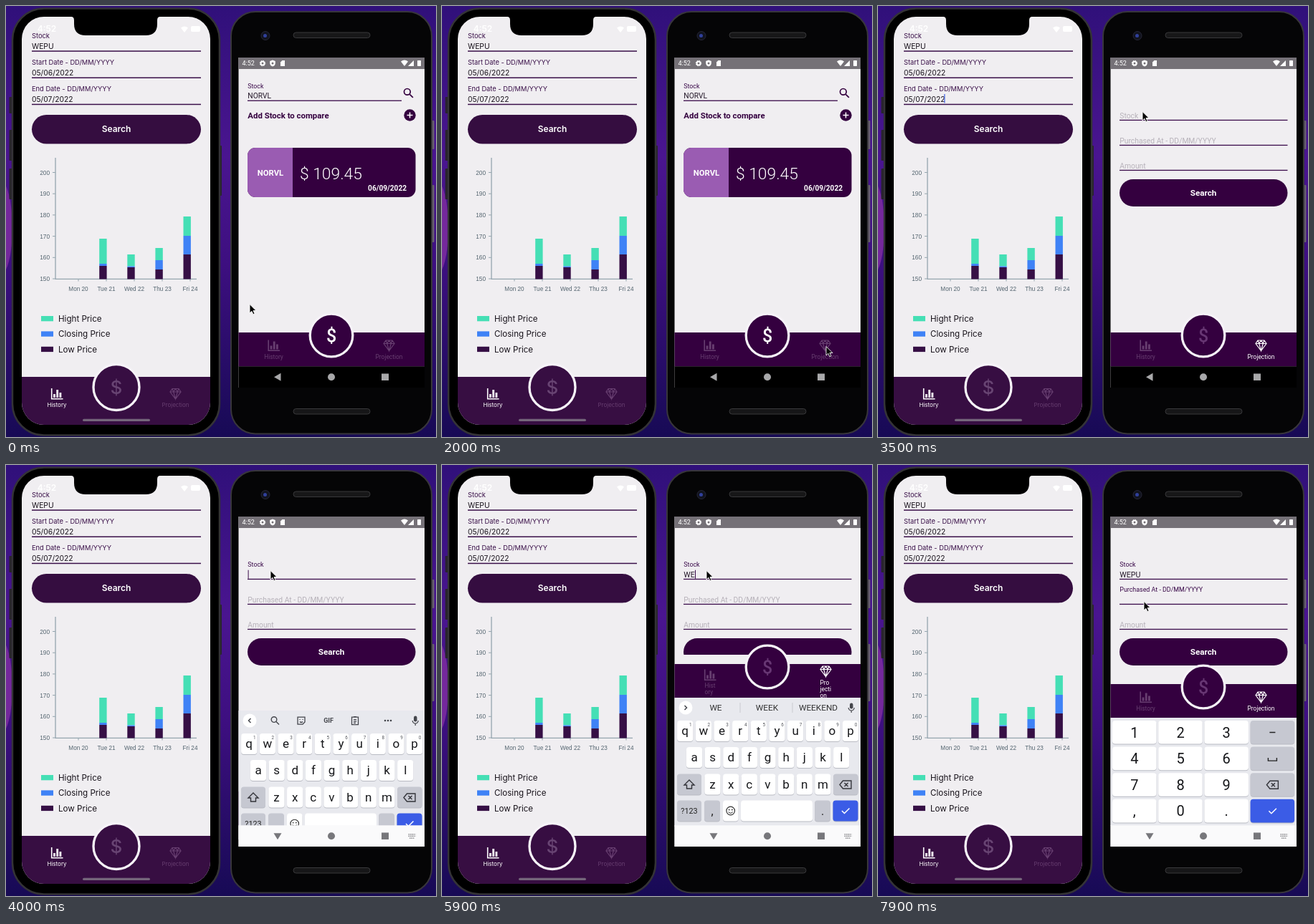
An HTML page that plays this animation: 600 px wide and 602 px high, repeating every 8000 ms.

```html
<!DOCTYPE html>
<html lang="en">
<head>
<title>Stock app on two phones</title>
<style>
html, body { margin: 0; width: 100%; height: 100%; overflow: hidden; background: #1d0a5c; }
svg { display: block; width: 600px; height: 602px; }
text { font-family: Roboto, "Open Sans", sans-serif; white-space: pre; }
.ios text { font-family: Inter, Roboto, sans-serif; }
.ios .axis text { font-family: "Liberation Sans", Arial, sans-serif; }
</style>
</head>
<body>
<svg viewBox="0 0 600 602">
  <defs>
    <linearGradient id="bg" x2="0" y2="1">
      <stop offset="0" stop-color="#30107a"/><stop offset=".35" stop-color="#4a1590"/>
      <stop offset=".6" stop-color="#3d0f80"/><stop offset="1" stop-color="#170a55"/>
    </linearGradient>
    <clipPath id="screen"><rect x="324.5" y="72" width="259.5" height="461"/></clipPath>
    <clipPath id="scroll"><rect x="324" y="88" width="260" height="177"/></clipPath>
    <clipPath id="card"><rect x="337" y="198" width="234.5" height="69" rx="11"/></clipPath>
  </defs>
  <rect width="600" height="602" fill="url(#bg)"/>
  <ellipse cx="-8" cy="310" rx="17" ry="66" fill="#74289c"/>
  <g id="ios" class="ios"></g>
  <g id="body"></g>
  <g clip-path="url(#screen)"><g id="app"></g><g id="keys"></g><g id="nav"></g></g>
  <path id="mouse" d="M0 0v12.5l2.9-2.7 2 4.4 2.1-.9-2-4.3h4z" stroke="#fff" stroke-width=".9"/>
</svg>
<script>
const $ = id => document.getElementById(id);
const LIGHT = '#f0eef1', PLUM = '#34003f', GRAPE = '#370e42', KEY = '#c6c8d1', DIM = '#673e70';
const TICKER = 'WEPU', OTHER = 'NORVL';

const rect = (x, y, w, h, fill, rx = 0, more = '') =>
  `<rect x="${x}" y="${y}" width="${w}" height="${h}" fill="${fill}" rx="${rx}" ${more}/>`;
const circle = (x, y, r, fill, more = '') => `<circle cx="${x}" cy="${y}" r="${r}" fill="${fill}" ${more}/>`;
const text = (x, y, s, size, fill, anchor = 'start', weight = 400, more = '') =>
  `<text x="${x}" y="${y}" font-size="${size}" fill="${fill}" text-anchor="${anchor}" font-weight="${weight}" ${more}>${s}</text>`;
const mid = (x, y, s, size, fill, weight) => text(x, y, s, size, fill, 'middle', weight);
const line = (d, color, w = 1.5, x = 0, y = 0) =>
  `<path d="${d}" transform="translate(${x} ${y})" fill="none" stroke="${color}" stroke-width="${w}"/>`;
const shape = (d, fill, x = 0, y = 0) => `<path d="${d}" transform="translate(${x} ${y})" fill="${fill}"/>`;

// Icons, placed by their centre
const bars = (x, y, c) => line('M-7.3-8V6.7H8.5', c, 1.6, x, y) + line('M-3.5 5V0M.7 5V-6M4.9 5V-2', c, 2.8, x, y);
const gem = (x, y, c) => line('M-4.5-7h9L7.5-2.5 0 7.5-7.5-2.5zM-7.5-2.5h15M-4.5-7l1.7 4.5L0 7.5l2.8-10L4.5-7M0-7l-2.8 4.5M0-7l2.8 4.5', c, 1.2, x, y);
const lens = (x, y, c, k, w) => line(`M${k} ${k}L${3 * k} ${3 * k}`, c, w, x, y) + circle(x - k * .5, y - k * .5, k * 1.9, 'none', `stroke="${c}" stroke-width="${w}"`);
const wifi = (x, y) => shape('M-5-2.5Q0-6.5 5-2.5L0 4z', '#fff', x, y);
const tick = (x, y) => line('M-5 0l3.5 3.5 7-7', '#fff', 1.5, x, y);
const erase = (x, y) => line('M-8 0l4.5-5.5H8v11H-3.5zM-1.5-2.5l5 5M3.5-2.5l-5 5', '#33343a', 1.4, x, y);
const coin = (x, y, r, fill, ink, size) =>
  circle(x, y, r, fill, 'stroke="#f6f3f8" stroke-width="3.3"') + mid(x, y + size * .35, '$', size, ink, 500);

function iosPhone() {
  const ink = '#3a1049', grey = '#546570', axis = '#94a5ae';
  let s = rect(4.5, 127, 5, 23, '#28252c', 1) + rect(4.5, 173, 5, 43, '#28252c', 1) + rect(4.5, 227, 5, 43, '#28252c', 1)
    + rect(297, 195, 4, 70, '#28252c', 1)
    + rect(9, 3.5, 289, 596, '#000', 44, 'stroke="#343336" stroke-width="2.5"')
    + rect(22, 15, 263, 570, LIGHT, 31)
    + shape('M22 518H285V554A31 31 0 0 1 254 585H53A31 31 0 0 1 22 554Z', GRAPE)
    + shape('M91 15q4 0 4 5v5q0 16 16 16h84q16 0 16-16v-5q0-5 4-5z', '#000')
    + mid(57, 36, '4:52', 12, '#fff', 600) + wifi(249, 33) + rect(258, 28, 13, 8, '#fff', 2);
  [['Stock', TICKER], ['Start Date - DD/MM/YYYY', '05/06/2022'], ['End Date - DD/MM/YYYY', '05/07/2022']].forEach(([label, value], i) => {
    const y = 37.2 * i;
    s += text(36, 44.5 + y, label, 9.3, ink) + text(36, 59.5 + y, value, 10.3, '#19131c') + rect(36, 62.3 + y, 236, 1.5, ink);
  });
  s += rect(36, 152, 236, 40.5, '#350d40', 20.2) + mid(154, 176.3, 'Search', 12, '#fff', 600);

  s += '<g class="axis">' + line('M69 212V381.3H266', axis, 1.3);
  for (let i = 0; i < 6; i++) {
    const y = 381 - 29.7 * i;
    s += text(61, y + 3, 150 + 10 * i, 8.3, grey, 'end') + line('M65 0h4', axis, 1, 0, y);
  }
  ['Mon 20', 'Tue 21', 'Wed 22', 'Thu 23', 'Fri 24'].forEach((d, i) => {
    s += mid(101 + 39 * i, 397.5, d, 8.2, grey) + line('M0 381v3.5', axis, 1, 101 + 39 * i);
  });
  s += '</g>';
  const colors = ['#45dfb5', '#3f82f6', '#360f45'];
  [[325, 360, 363], [347, 363.5, 365], [338, 355, 368], [294, 321, 347]].forEach((tops, i) =>
    tops.forEach((y, k) => s += rect(130.2 + 39.1 * i, y, 10.4, (tops[k + 1] || 381.5) - y, colors[k])));
  ['Hight Price', 'Closing Price', 'Low Price'].forEach((label, i) => {
    const y = 21.4 * i;
    s += rect(49, 433 + y, 17, 7.3, colors[i]) + text(73, 440.8 + y, label, 11.6, '#18131b');
  });
  s += coin(154, 532.5, 32, GRAPE, '#684473', 26)
    + bars(71, 542, '#fff') + mid(71, 559.5, 'History', 8, '#fff')
    + gem(236.5, 541.5, DIM) + mid(236.5, 559.5, 'Projection', 8, DIM)
    + rect(107, 576.7, 94, 3.4, '#75667b', 1.7)
    + `<g id="iosCaret">${rect(92.3, 123, 1.2, 12.5, '#3f63e8')}</g>`;
  return s;
}

function androidBody() {
  return rect(592, 160, 5.5, 40, '#68606f', 1) + rect(592, 250, 5.5, 80, '#68606f', 1)
    + rect(314, 8, 280, 589.5, '#050506', 34, 'stroke="#38363b" stroke-width="2"')
    + [37, 562.5].map(y => rect(401, y, 107, 7.5, '#171718', 3.7, 'stroke="#39393b"')).join('')
    + circle(362, 41.5, 6, '#11131d', 'stroke="#262638"') + circle(361.5, 41.5, 2.5, '#30409b');
}

function statusBar() {
  return rect(324, 72, 260, 16, '#757177') + text(329.5, 83.3, '4:52', 9, '#fff')
    + circle(358, 80, 2.5, 'none', 'stroke="#fff" stroke-width="2"')
    + circle(358, 80, 3.8, 'none', 'stroke="#fff" stroke-width="1" stroke-dasharray="1.5 1.5"')
    + shape('M0-4.5l3.8 1.5V0Q3.5 3.5 0 4.5-3.5 3.5-3.8 0v-3z', '#fff', 372, 80) + circle(372, 80, 1.5, '#757177')
    + shape('M-3-1.5L-.5-4H3V4h-6z', '#fff', 386, 80)
    + wifi(556, 80) + shape('M4-4V4h-8z', '#fff', 565, 80) + rect(574, 76, 5, 8, '#fff', .8);
}

function home() {
  return text(337.3, 115, 'Stock', 8.8, '#3a0a4a') + text(337.3, 129.3, OTHER, 10.3, '#241829')
    + rect(337, 131.6, 215, 1.3, '#3a0a4a') + lens(561, 121, PLUM, 2.3, 1.7)
    + text(337.3, 156.8, 'Add Stock to compare', 11.4, PLUM, 'start', 700)
    + circle(563.5, 152.5, 8.2, PLUM) + line('M-4 0h8M0-4v8', '#fff', 1.5, 563.5, 152.5)
    + `<g clip-path="url(#card)">${rect(337, 198, 235, 69, PLUM)}${rect(337, 198, 63, 69, '#9a5cb2')}</g>`
    + mid(369, 237.2, OTHER, 11.3, '#fff', 700) + text(410, 242, '$ 109.45', 22.8, '#fff', 'start', 300)
    + text(559, 258.3, '06/09/2022', 10.1, '#fff', 'end', 700);
}

function form({ focus, typed, pad }) {
  let s = '';
  ['Stock', 'Purchased At - DD/MM/YYYY', 'Amount'].forEach((label, i) => {
    const y = 35 * i, value = i ? '' : typed;
    s += focus === i || value
      ? text(337.3, 141.7 + y, label, 8.9, '#3a0a4a') + text(337.3, 156.7 + y, value, 10.6, '#241829', 'start', 400, `data-field="${i}"`)
      : text(337.3, 157 + y, label, 10.3, '#b7b2ba');
    s += rect(337, 158.8 + y, 234.5, 1.3, '#3a0a4a');
  });
  const button = rect(337, 242, 234.5, 38, PLUM, 19) + mid(454, 265.4, 'Search', 11.7, '#fff', 700);
  return s + (pad === 'letters' ? `<g clip-path="url(#scroll)">${button}</g>` : button);
}

function tabs({ page, pad }) {
  const top = { letters: 278, digits: 306 }[pad] || 456;
  const on = page === 'form' ? '#fff' : DIM;
  let s = rect(324, top, 260, 47.5, PLUM) + coin(454, top + 4, 29.8, PLUM, page === 'home' ? '#fff' : '#673673', 25);
  if (pad === 'letters') {
    ['Hist', 'ory'].forEach((w, i) => s += text(366.5, top + 33 + 9.3 * i, w, 8.4, DIM));
    ['Pro', 'jecti', 'on'].forEach((w, i) => s += text(527.5, top + 28.5 + 9.3 * i, w, 8.4, on));
    return s + bars(374, top + 15.5, DIM) + gem(535.5, top + 10, on);
  }
  return s + bars(373.5, top + 18.5, DIM) + mid(373.5, top + 36.6, 'History', 8.4, DIM)
    + gem(534.5, top + 18, on) + mid(534.5, top + 36.6, 'Projection', 8.4, on);
}

const key = (x, y, w, h, fill = '#fff') => rect(x, y + 1, w, h, '#b9bbc3', 4) + rect(x, y, w, h, fill, 4);

function suggestions(typed) {
  const c = '#44464c';
  const words = { W: ['W', 'WE', 'WAS'], WE: ['WE', 'WEEK', 'WEEKEND'], WEP: ['WEP', 'WEPT', 'WERE'], WEPU: [TICKER, 'WEPT', 'WERE'] }[typed];
  let s = circle(340, 339, 9.5, '#fff') + line(words ? 'M-1.5-3l3 3-3 3' : 'M1.5-3l-3 3 3 3', c, 1.5, 340, 339)
    + rect(569, 332.5, 4.5, 8, c, 2.2) + line('M-4 0a4 4 0 0 0 8 0M0 4v3', c, 1.2, 571.2, 339);
  if (words) {
    words.forEach((w, i) => s += mid(382 + 71.5 * i, 343.2, w, 11.8, '#333'));
    return s + line('M416 332v14M489 332v14', '#c9cad0', 1);
  }
  return s + lens(375, 338.5, c, 2, 1.4)
    + line('M-5-5H5V2L2 5H-5zM-2-2v1M2-2v1M-2 1.5q2 2 4 0', c, 1.3, 412, 339)
    + mid(450, 342.3, 'GIF', 9, c, 700)
    + line('M-4.5-5h9V5.5h-9zM-2-5.5h4M-2-1.5h4M-2 1h4M-2 3.3h3', c, 1.3, 487, 339)
    + [529, 533, 537].map(x => circle(x, 339, 1.3, c)).join('');
}

function letters(typed) {
  let s = rect(324, 325, 260, 180, '#e8e9ee') + suggestions(typed);
  [['qwertyuiop', 339.2, 357], ['asdfghjkl', 352, 394], ['zxcvbnm', 377.5, 431.5]].forEach(([row, x0, y]) =>
    [...row].forEach((ch, i) => {
      const x = x0 + 25.65 * i;
      s += key(x - 11.1, y, 22.2, 29) + mid(x, y + 20.2, ch, 17, '#16171a');
      if (y === 357) s += mid(x + 7.5, y + 8, (i + 1) % 10, 6.3, '#55575d');
    }));
  s += key(328, 431.5, 34, 29, KEY) + line('M0-6.5l7 7H3.5v5h-7v-5H-7z', '#33343a', 1.4, 345, 446.5)
    + key(546, 431.5, 34.5, 29, KEY) + erase(563, 446.5)
    + key(328, 468.5, 34, 29, KEY) + mid(345, 487, '?123', 10.8, '#222')
    + key(366, 468.5, 22, 29, KEY) + mid(377, 489, ',', 16, '#222')
    + key(392, 468.5, 21.5, 29) + circle(402.7, 483, 5.8, 'none', 'stroke="#333" stroke-width="1.2"')
    + circle(400.6, 481.5, .9, '#333') + circle(404.8, 481.5, .9, '#333') + line('M-3 1.5q3 3.5 6 0', '#333', 1.1, 402.7, 483)
    + key(417, 468.5, 100, 29) + key(520, 468.5, 22, 29, KEY) + mid(531, 489, '.', 16, '#222')
    + key(545.5, 468.5, 35, 29, '#3b5ce6') + tick(563, 483);
  return s;
}

function digits() {
  let s = rect(324, 353, 260, 151, '#e8e9ee');
  [...'123-456_789<,0.!'].forEach((ch, i) => {
    const col = i % 4, x = 327 + 64.2 * col, y = 357 + 36.6 * (i >> 2), side = col === 3;
    s += key(x, y, 61.5, 32.6, ch === '!' ? '#3b5ce6' : side ? KEY : '#fff');
    const cx = x + 30.8, cy = y + 16.5;
    s += { '-': line('M-4 0h8', '#222', 1.5, cx, cy), _: line('M-6-1v4H6v-4', '#222', 1.4, cx, cy), '<': erase(cx, cy), '!': tick(cx, cy) }[ch]
      || mid(cx, cy + 7, ch, 20, '#16171a');
  });
  return s;
}

function navBar(open) {
  const c = open ? '#77777b' : '#a8a8aa';
  return rect(324, 503.3, 260, 30, open ? '#fafafb' : '#000')
    + shape(open ? 'M-5.5-4h11L0 5z' : 'M4.5-5.5v11L-5 0z', c, 379, 518.3)
    + circle(454, 518.3, 5, c) + rect(524, 513.5, 10, 9.5, c)
    + (open ? line('M-5-2.5H5M-5 0H5M-3.5 2.8h7', c, 1.3, 566.5, 518.3).replace('/>', ' stroke-dasharray="1.6 .8"/>') : '');
}

// Pointer stops: time, x, y
const path = [[0, 340, 416.5], [600, 340, 416.5], [1500, 536, 475.5], [2500, 536, 475.5], [3200, 369, 147.5],
  [6350, 369, 147.5], [6850, 364.5, 209], [7000, 364.5, 209], [7300, 371, 190.5], [8000, 371, 190.5]];
const typing = [5050, 5450, 6050, 6450];
const OPEN_FORM = 2350, FOCUS = 3800, FOCUS_DATE = 7400, SWITCH = 7550;
const ease = u => u * u * (3 - 2 * u);

function pointer(t) {
  const i = path.findIndex(p => p[0] > t), a = path[i - 1], b = path[i];
  const u = ease((t - a[0]) / (b[0] - a[0]));
  return [1, 2].map(k => a[k] + (b[k] - a[k]) * u);
}

function stateAt(t) {
  const focus = t < FOCUS ? -1 : t < FOCUS_DATE ? 0 : 1;
  const lastTouch = [FOCUS, ...typing, FOCUS_DATE].filter(e => e <= t).pop();
  return {
    page: t < OPEN_FORM ? 'home' : 'form',
    focus,
    typed: TICKER.slice(0, typing.filter(e => e <= t).length),
    pad: t < FOCUS + 250 ? '' : t < SWITCH ? 'letters' : 'digits',
    keys: t < FOCUS ? '' : t < SWITCH ? 'letters' : 'digits',
    caret: focus >= 0 && (t - lastTouch) % 1000 < 500
  };
}

let shown = '';
function draw(t) {
  const s = stateAt(t), id = JSON.stringify(s);
  if (id !== shown) {
    shown = id;
    $('app').innerHTML = rect(324, 72, 260, 461, LIGHT) + statusBar() + (s.page === 'home' ? home() : form(s)) + tabs(s);
    $('keys').innerHTML = { letters: letters(s.typed), digits: digits() }[s.keys] || '';
    $('nav').innerHTML = navBar(s.keys);
    if (s.caret) {
      const x = 337.6 + $('app').querySelector(`[data-field="${s.focus}"]`).getComputedTextLength();
      $('app').insertAdjacentHTML('beforeend', rect(x, 146.7 + 35 * s.focus, 1, 12, '#3a0a4a'));
    }
  }
  const rise = Math.min(1, Math.max(0, (t - FOCUS) / 250));
  $('keys').setAttribute('transform', `translate(0 ${180 * (1 - ease(rise))})`);
  $('mouse').setAttribute('transform', `translate(${pointer(t)})`);
  $('iosCaret').style.display = t % 1000 >= 300 && t % 1000 < 800 ? '' : 'none';
}

$('ios').innerHTML = iosPhone();
$('body').innerHTML = androidBody();
const start = performance.now();
function loop() {
  draw((performance.now() - start) % 8000);
  requestAnimationFrame(loop);
}
loop();
</script>
</body>
</html>
```
